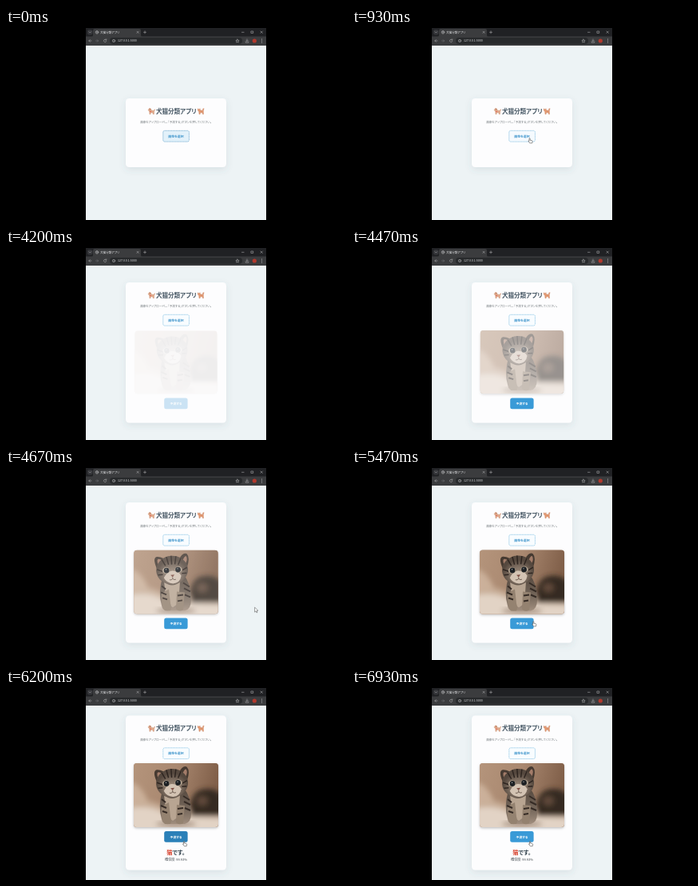
Animation of 426 by 240 pixels, one loop 6990 ms. Source, as an HTML page:

```html
<!DOCTYPE html>
<html lang="ja">
<head>
<meta charset="utf-8">
<title>犬猫分類アプリ</title>
<style>
html, body { margin: 0; width: 100%; height: 100%; overflow: hidden; background: #000; }
svg { display: block; width: 100vw; height: 100vh; }
text { font-family: "Noto Sans CJK JP", "Noto Sans CJK", "Noto Sans", sans-serif; font-feature-settings: "palt"; }
.mid { text-anchor: middle; }
.bold { font-weight: 700; }
.icon { fill: none; stroke: #a9aaac; stroke-width: .6; stroke-linecap: round; stroke-linejoin: round; }
</style>
</head>
<body>
<svg viewBox="0 0 426 240" xmlns="http://www.w3.org/2000/svg">
  <defs>
    <filter id="shadow" x="-20%" y="-20%" width="140%" height="150%">
      <feDropShadow dx="0" dy="3" stdDeviation="4" flood-color="#4a6070" flood-opacity=".12"/>
    </filter>
    <filter id="photoShadow" x="-10%" y="-10%" width="120%" height="130%">
      <feDropShadow dx="0" dy="1.3" stdDeviation="1.6" flood-color="#000" flood-opacity=".25"/>
    </filter>
    <filter id="lens" x="-5%" y="-5%" width="110%" height="110%"><feGaussianBlur stdDeviation=".28"/></filter>
    <filter id="soft" x="-30%" y="-30%" width="160%" height="160%"><feGaussianBlur stdDeviation="3"/></filter>
    <filter id="fur" x="-10%" y="-10%" width="120%" height="120%"><feGaussianBlur stdDeviation=".75"/></filter>
    <linearGradient id="wall" x2="1" y2=".2">
      <stop stop-color="#b4947b"/><stop offset=".5" stop-color="#a98870"/><stop offset="1" stop-color="#805f49"/>
    </linearGradient>
    <linearGradient id="coat" x2="0" y2="1">
      <stop stop-color="#54473d"/><stop offset=".6" stop-color="#75675b"/><stop offset="1" stop-color="#a18e7e"/>
    </linearGradient>
    <radialGradient id="face" cy=".65">
      <stop stop-color="#a39180"/><stop offset=".55" stop-color="#7d6d60"/><stop offset="1" stop-color="#55483e"/>
    </radialGradient>
    <clipPath id="frame"><rect width="106" height="80" rx="4"/></clipPath>
    <clipPath id="view"><rect x="100" y="22" width="226" height="218"/></clipPath>
  </defs>

  <rect width="426" height="240" fill="#000"/>

  <rect x="100" width="226" height="11" fill="#202124"/>
  <rect x="100" y="10.5" width="226" height="11.5" fill="#3b3c3e"/>
  <g filter="url(#lens)">
    <rect x="102" y="2" width="6.5" height="6.5" rx="2" fill="#35363a"/>
    <path class="icon" d="M104 4.7l1.3 1.3 1.3-1.3"/>
    <path d="M107 11q2 0 2-2V3q0-2 2-2h56q2 0 2 2v6q0 2 2 2z" fill="#3b3c3e"/>
    <circle class="icon" cx="114" cy="5.3" r="1.8"/>
    <path class="icon" d="M112.4 5h3.2M114 3.6v3.4"/>
    <text x="118" y="6.9" font-size="3.6" fill="#e4e5e7">犬猫分類アプリ</text>
    <path class="icon" d="M164 4.2l2.2 2.2m0-2.2l-2.2 2.2M172.5 5.3h3M174 3.8v3"/>
    <g id="controls" class="icon">
      <path d="M295.5 5.3h2.6M319 4l2.4 2.4m0-2.4l-2.4 2.4"/>
      <rect x="307.3" y="4" width="2.4" height="2.4"/>
    </g>
    <path class="icon" d="M107 16h-3.2m1.4-1.4L103.8 16l1.4 1.4"/>
    <path class="icon" d="M112.4 16h3.2m-1.4-1.4l1.4 1.4-1.4 1.4" opacity=".45"/>
    <path class="icon" d="M125.6 15a1.7 1.7 0 1 0 .2 1.5M125.8 13.9V15h-1.2"/>
    <rect x="130" y="12" width="166" height="8.2" rx="4.1" fill="#282a2c"/>
    <circle class="icon" cx="135" cy="16" r="1.7"/>
    <path class="icon" d="M135 15.9v.9M135 15v.1"/>
    <text x="140" y="17.4" font-size="3.55" fill="#e4e5e7">127.0.0.1:5000</text>
    <path class="icon" d="M290 14.1l.6 1.3 1.5.2-1.1 1 .3 1.5-1.3-.7-1.3.7.3-1.5-1.1-1 1.5-.2z"/>
    <path class="icon" d="M302 13.9v2.8m-1.1-1.1l1.1 1.1 1.1-1.1M300.2 17v1.2h3.6V17"/>
    <circle cx="311.3" cy="16" r="2.6" fill="#b3392d"/>
    <path d="M320.5 14v.1m0 1.9v.1m0 1.9v.1" stroke="#c5c6c8" stroke-width=".9" stroke-linecap="round"/>
  </g>

  <g clip-path="url(#view)">
    <rect x="100" y="22" width="226" height="218" fill="#edf3f5"/>
    <rect id="card" x="150" width="126" rx="4.5" fill="#fdfdfe" filter="url(#shadow)"/>
    <g id="content" filter="url(#lens)">
      <g transform="translate(178 12) scale(.95)" fill="#e0ab8c" stroke="#c48a6e" stroke-width=".4">
        <path d="M.3 2.2L1.8.3l1.8.6.9 2 2.9.7L8.6 1.6l.4.4-.9 2.7-.3 3.5H6.6L6 6.3 3.7 6l-.5 2.2H2L1.7 4.1.4 3.4z"/>
        <path d="M1.9.8l1 .2.2 2-1-.4z" fill="#b57a60" stroke="none"/>
        <path d="M2.2 4.3l2.2.4-.2.7-2.1-.3z" fill="#e4574d" stroke="none"/>
      </g>
      <g transform="translate(240 12) scale(.95)" fill="#e39a72" stroke="#c27a58" stroke-width=".4">
        <path d="M.3.8l1 .7h1l1-.8.2 2.1 3 .5.7-2.4L8.6.8l-.4.8-.5 2.3.2 4.3H6.8L6.3 6.3 3.7 6.1l-.4 2.1H2.1L1.7 4.5.4 3.4z"/>
        <path d="M4.3 3.4l.3 1.2m.9-1l.1 1.2" fill="none"/>
      </g>
      <text class="mid bold" x="213.3" y="18.8" font-size="7.55" fill="#465764">犬猫分類アプリ</text>
      <text class="mid" x="212.8" y="31" font-size="3.6" fill="#747b7f">画像をアップロードし、「予測する」ボタンを押してください。</text>
      <rect id="pick" x="196.8" y="40.3" width="32.6" height="13.8" rx="2" stroke-width=".7" stroke-dasharray="1.3 .7"/>
      <text class="mid bold" x="213" y="48.6" font-size="3.9" fill="#3d94cb">画像を選択</text>
    </g>

    <g id="photo">
      <rect width="106" height="80" rx="4" fill="#a98870" filter="url(#photoShadow)"/>
      <g clip-path="url(#frame)">
        <rect width="106" height="80" fill="url(#wall)"/>
        <g filter="url(#soft)">
          <path d="M-6 48Q18 42 40 56L112 62V90H-6z" fill="#c7ad97"/>
          <path d="M-6 57Q22 50 42 66L112 69V90H-6z" fill="#e2d3c5"/>
          <path d="M-6 24Q8 24 18 48L-6 54z" fill="#cbb09a"/>
          <path d="M72 66Q68 42 82 34q18-6 30 7v25z" fill="#352a23"/>
          <ellipse cx="86" cy="47" rx="7" ry="6" fill="#604a3b"/>
        </g>
        <ellipse cx="53" cy="76" rx="25" ry="3" fill="#6d5444" opacity=".6" filter="url(#soft)"/>
        <g filter="url(#fur)">
          <path d="M36 34Q30 54 35 70q1 7 9 6h20q8-2 8-13Q73 43 62 30z" fill="url(#coat)"/>
          <path d="M38 40q10 8 20 0l-2 27-7 5-8-6z" fill="#b8a592"/>
          <path d="M35 54q-1 17 4 22h7q2-4 0-9l-2-18zM54 52l-1 22q4 4 9 1l2-22z" fill="#948270"/>
          <g transform="rotate(-4 48 24)">
            <path d="M29 22Q24 8 30 7q8 0 13 8zM57 13q6-10 11-7 4 5-1 17z" fill="#463a31"/>
            <path d="M31 18q-2-8 1-8 5 1 7 6zM62 14q3-6 5-5 2 4-2 10z" fill="#a37c69"/>
            <ellipse cx="48" cy="25" rx="20" ry="18" fill="url(#face)"/>
            <path d="M37 34q5-8 10-8 9 0 12 7-2 9-11 9-8-1-11-8z" fill="#d3c3b3"/>
            <path d="M42 8l2 10M48 7v11M54 8l-2 10M36 11l4 8M60 11l-4 8M29 23l7 3M30 30l6 0M67 23l-6 3M66 30l-6 0" fill="none" stroke="#2e2520" stroke-width="1.5"/>
            <ellipse cx="40.5" cy="25" rx="4.6" ry="4" fill="#b7a794"/>
            <ellipse cx="56" cy="25" rx="4.6" ry="4" fill="#b7a794"/>
            <circle cx="41" cy="25" r="3.4" fill="#1d2023"/>
            <circle cx="55.5" cy="25" r="3.4" fill="#1d2023"/>
            <path d="M45.6 31h5l-2.5 3z" fill="#7d4e43"/>
            <path d="M48 34v2m-4 1q2 1 4-1 2 2 4 1" fill="none" stroke="#5c493f" stroke-width=".8"/>
          </g>
          <path d="M62 41l8 5M63 48l8 4M64 56l7 3M35 45l5 4M34 53l7 3M36 60l6 2M55 57l7-1M55 64l6-1" fill="none" stroke="#352b25" stroke-width="2"/>
        </g>
        <path d="M40 24.3h1M54.5 23.3h1" stroke="#eef3f5" stroke-width=".9"/>
      </g>
    </g>

    <g id="predict">
      <rect x="198.2" width="29.4" height="13.8" rx="2.5"/>
      <text class="mid bold" x="213" y="8.5" font-size="3.9" fill="#fff">予測する</text>
    </g>

    <g id="result" filter="url(#lens)">
      <text class="mid bold" x="212.7" y="207.8" font-size="7.2" fill="#34444f"><tspan fill="#d8432f">猫</tspan>です。</text>
      <text class="mid" x="213" y="216.4" font-size="4" font-weight="500" fill="#3f474d">確信度: 99.93%</text>
    </g>
  </g>

  <path id="hand" d="M0 .5q.6-.8 1.1 0v2.2l2.3.5q.8.3.7 1.2l-.4 2H.8L-.9 4.1q-.2-.9.4-.6l.5.4z" fill="#fff" stroke="#333" stroke-width=".5" stroke-linejoin="round"/>
  <path id="arrow" d="M0 0v6l1.4-1.3 1 2.1 1-.5-1-2 1.9-.2z" fill="#fff" stroke="#333" stroke-width=".45"/>
</svg>
<script>
const LOOP = 6990;
const BLUR = 1470, LOADED = 4070, PREDICTED = 6000;
const HOVER_PICK = 840, HOVER_PREDICT = 5440;
const el = Object.fromEntries([...document.querySelectorAll("svg [id]")].map(n => [n.id, n]));
const set = (node, attrs) => Object.entries(attrs).forEach(([k, v]) => node.setAttribute(k, v));
const clamp = v => Math.max(0, Math.min(1, v));
const ramp = (t, start, length) => {
  const p = clamp((t - start) / length);
  return p * p * (3 - 2 * p);
};
const mix = (a, b, p) => a + (b - a) * p;
const rgb = (a, b, p) => `rgb(${a.map((v, i) => Math.round(mix(v, b[i], p)))})`;

// Card top and height, for the empty, loaded and predicted layouts.
const layouts = [
  { top: 88, height: 86 },
  { top: 43, height: 175.5 },
  { top: 34.5, height: 193 }
];
// Pointer paths: time, x, y.
const paths = [
  [[70, 317, 194], [400, 276, 190], [730, 238, 175], [920, 222, 137.5], [BLUR, 222, 137.5]],
  [[4600, 321, 172], [5000, 268, 184], [5300, 236, 190], [5470, 226.8, 191.5], [5640, 222.5, 191.3], [LOOP, 222.5, 191.3]]
];

// The pointer keeps its speed through the waypoints.
function pointerAt(t) {
  const path = paths.find(p => t >= p[0][0] && t < p.at(-1)[0]);
  if (!path) return null;
  const i = path.findIndex(p => p[0] > t);
  const [a, b] = [path[i - 1], path[i]];
  const p = (t - a[0]) / (b[0] - a[0]);
  return { x: mix(a[1], b[1], p), y: mix(a[2], b[2], p) };
}

function drawPointer(t) {
  const pos = pointerAt(t);
  const overButton = (t > HOVER_PICK && t < BLUR) || t > HOVER_PREDICT;
  for (const [node, shown] of [[el.hand, overButton], [el.arrow, !overButton]]) {
    node.style.display = pos && shown ? "" : "none";
    if (pos) set(node, { transform: `translate(${pos.x} ${pos.y})` });
  }
}

function draw(t) {
  const stage = t < LOADED ? 0 : t < PREDICTED ? 1 : 2;
  const { top, height } = layouts[stage];
  set(el.card, { y: top, height });
  set(el.content, { transform: `translate(0 ${top})` });

  const inactive = t >= BLUR && t < LOADED;
  set(el.controls, { opacity: inactive ? 0.4 : 1 });

  const lit = t < LOADED ? 1 - ramp(t, HOVER_PICK - 60, 200) + ramp(t, BLUR, 300) : 0;
  set(el.pick, {
    fill: rgb([248, 252, 255], [226, 241, 250], lit),
    stroke: rgb([112, 184, 224], [84, 154, 198], lit)
  });

  const show = ramp(t, LOADED, 800);
  const scale = mix(0.97, 1, show);
  set(el.photo, {
    opacity: show,
    transform: `translate(213 ${top + 99.5}) scale(${scale}) translate(-53 -40)`
  });

  const hover = ramp(t, HOVER_PREDICT + 30, 250) - ramp(t, 6210, 250);
  set(el.predict, {
    opacity: ramp(t, LOADED, 400),
    transform: `translate(0 ${top + 144.5})`,
    fill: rgb([57, 154, 215], [43, 128, 184], hover)
  });
  set(el.result, { opacity: stage === 2 ? 1 : 0 });
  drawPointer(t);
}

function tick() {
  draw(performance.now() % LOOP);
  requestAnimationFrame(tick);
}
tick();
</script>
</body>
</html>
```
